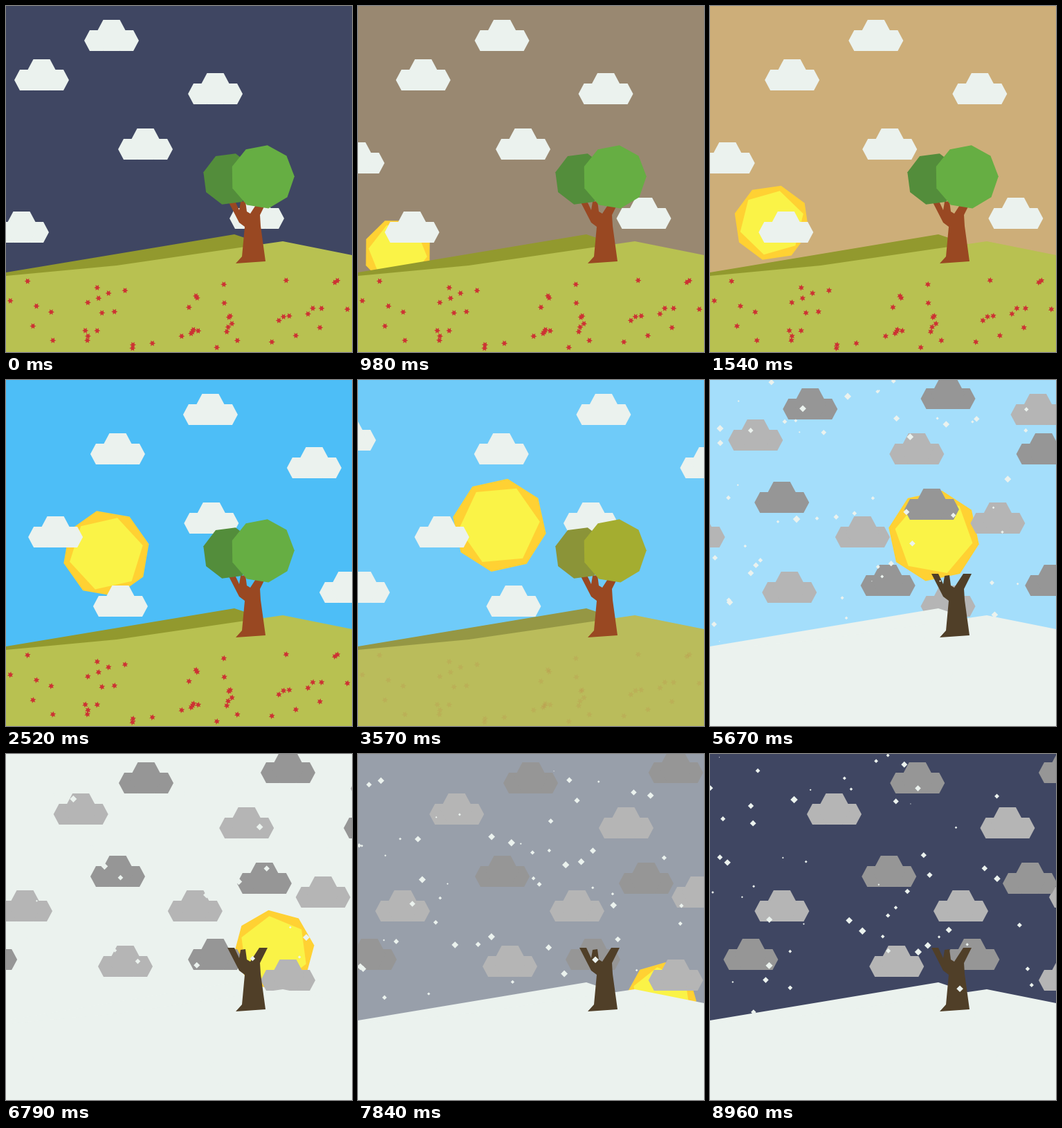
Write an HTML page with a canvas that moves like this. It is 500x500 px and loops after 9030 ms.

```html
<!DOCTYPE html>
<html lang="en">
<head>
<meta charset="utf-8">
<title>Seasons</title>
<style>
html, body { margin: 0; width: 100%; height: 100%; overflow: hidden; background: #3f4662; }
canvas { display: block; width: 500px; height: 500px; }
</style>
</head>
<body>
<canvas id="stage" width="500" height="500"></canvas>
<script>
const ctx = document.getElementById('stage').getContext('2d');
const LOOP = 9030, STEP = 70, TURN = 2 * Math.PI;
const SNOW = '#ebf2ee', NIGHT = '#3f4662';

// Day: colours from night through dawn and noon to winter and night again.
const sky = { times: [0, 1540, 2520, 4620, 5670, 6790, 8960],
  values: [NIGHT, '#cdae79', '#4dbef7', '#91d8fa', '#a4defb', SNOW, NIGHT] };

// Colours for summer, autumn and winter.
const season = (...values) => ({ times: [2700, 4620, 5500], values });
const frontHill = season('#b8c151', '#bdb568', SNOW);
const backHill = season('#92992e', '#99945f', SNOW);
const frontLeaf = season('#66ae43', '#eeab18', '#eeab18');
const backLeaf = season('#538d3b', '#cf9c34', '#cf9c34');
const bark = season('#994822', '#994822', '#503f28');
const cloudTone = season(SNOW, SNOW, '#b5b5b5');

// Each cloud: start x, top y, seconds-per-distance factor.
const clouds = [[113, 20, 1], [263, 97, 1], [-17, 297, 1], [323, 277, 1.1], [-217, 277, 1.1],
  [-87, 197, 1.2], [12, 77, 1.3], [-287, 197, 1.4], [162, 177, 1.5], [-188, 57, 1.5]];
const storms = [[-17, -3, 1], [-187, 12, 1.1], [-228, 147, 1.1], [163, 267, 1.1], [13, 157, 1.2],
  [-359, 267, 1.3], [213, 77, 1.4], [-12, 267, 1.4]];

let seed = 71;
const random = (low, high) => {
  seed = seed * 16807 % 2147483647;
  return low + (high - low) * seed / 2147483647;
};
const many = (length, make) => Array.from({ length }, make);
const flowers = many(50, () => ({ x: random(6, 494), y: random(390, 496) }));
const flakes = many(78, () => {
  const size = random(0.7, 5.3);
  return { size, x: random(0, 500), y: random(0, 512), fall: 0.03 + 0.016 * size, phase: random(0, TURN) };
});

const clamp = v => Math.min(1, Math.max(0, v));
const ramp = (t, from, to) => clamp((t - from) / (to - from));
const mix = (a, b, k) => a + (b - a) * k;
const channels = hex => [1, 3, 5].map(i => parseInt(hex.slice(i, i + 2), 16));

function colorAt({ times, values }, t) {
  let i = 0;
  while (i < times.length - 2 && t > times[i + 1]) i++;
  const k = ramp(t, times[i], times[i + 1]), end = channels(values[i + 1]);
  return `rgb(${channels(values[i]).map((c, j) => Math.round(mix(c, end[j], k))).join()})`;
}

// Wind distance: steady, slightly slower in the last quarter.
const windAt = t => 0.0567 * Math.min(t, 6790) + 0.0493 * Math.max(0, t - 6790);

function poly(color, ...points) {
  ctx.fillStyle = color;
  ctx.beginPath();
  for (const [x, y] of points) ctx.lineTo(x, y);
  ctx.fill();
}

// Regular polygon, or a star when an inner radius is given.
function ring(color, x, y, sides, degrees, r, inner) {
  const n = inner ? sides * 2 : sides;
  poly(color, ...many(n, (_, i) => {
    const a = TURN * (degrees / 360 + i / n), d = inner && i % 2 ? inner : r;
    return [x + d * Math.cos(a), y + d * Math.sin(a)];
  }));
}

function hexagon(color, x, y, w, h) {
  const slant = h * 4 / 15, mid = y + h / 2;
  poly(color, [x, mid], [x + slant, y], [x + w - slant, y],
    [x + w, mid], [x + w - slant, y + h], [x + slant, y + h]);
}

function drawClouds(list, wind, color) {
  for (const [x0, y, slow] of list) {
    const x = x0 + wind / slow;
    hexagon(color, x, y + 15, 35.5, 30);
    hexagon(color, x + 43.5, y + 15, 35.5, 30);
    hexagon(color, x + 15.5, y, 48, 45);
  }
}

function drawSun(wind) {
  const x = wind + 2, height = Math.sin(Math.PI * x / 500);
  const y = 442 - 242 * height, r = 39 + 30.5 * height, angle = 4.8 + 1.137 * wind;
  ring('#ffd133', x, y, 8, angle, r);
  ring('#faf347', x, y, 6, angle, r * 0.858);
}

function drawHills(t) {
  poly(colorAt(backHill, t), [0, 385], [330, 330], [390, 350], [390, 500], [0, 500]);
  poly(colorAt(frontHill, t), [0, 390], [160, 375], [400, 340], [500, 360], [500, 500], [0, 500]);
}

function drawFlowers(t) {
  ctx.globalAlpha = 1 - ramp(t, 2800, 3640);
  for (const { x, y } of flowers) ring('#cc3333', x, y, 6, t * 0.0645, 4.6, 2.3);
  ctx.globalAlpha = 1;
}

function drawTree(t) {
  poly(colorAt(bark, t),
    [320, 280], [330, 280], [337, 295], [339, 283], [346, 282], [348, 297], [353, 300], [366, 280],
    [378, 280], [367, 302], [368, 318], [375, 369], [332, 372], [341, 362], [345, 319], [337, 313]);
  ctx.globalAlpha = 1 - ramp(t, 4690, 5530);
  ring(colorAt(backLeaf, t), 322, 250, 8, 15, 38);
  ring(colorAt(frontLeaf, t), 370.5, 247, 9, -1, 46.3);
  ctx.globalAlpha = 1;
}

function drawSnow(t) {
  ctx.globalAlpha = ramp(t, 3700, 4500);
  for (const f of flakes)
    ring(SNOW, f.x + 6 * Math.sin(t / 700 + f.phase), (f.y + f.fall * t) % 512 - 6, 4, 0, f.size);
  ctx.globalAlpha = 1;
}

function draw(t) {
  const wind = windAt(t);
  ctx.fillStyle = colorAt(sky, t);
  ctx.fillRect(0, 0, 500, 500);
  drawSun(wind);
  drawClouds(clouds, wind, colorAt(cloudTone, t));
  ctx.globalAlpha = ramp(t, 3700, 5670);
  drawClouds(storms, wind, '#969696');
  ctx.globalAlpha = 1;
  drawHills(t);
  drawFlowers(t);
  drawTree(t);
  drawSnow(t);
}

const start = performance.now();
function tick() {
  const t = (performance.now() - start) % LOOP;
  draw(Math.floor(t / STEP) * STEP);
  requestAnimationFrame(tick);
}
tick();
</script>
</body>
</html>
```
